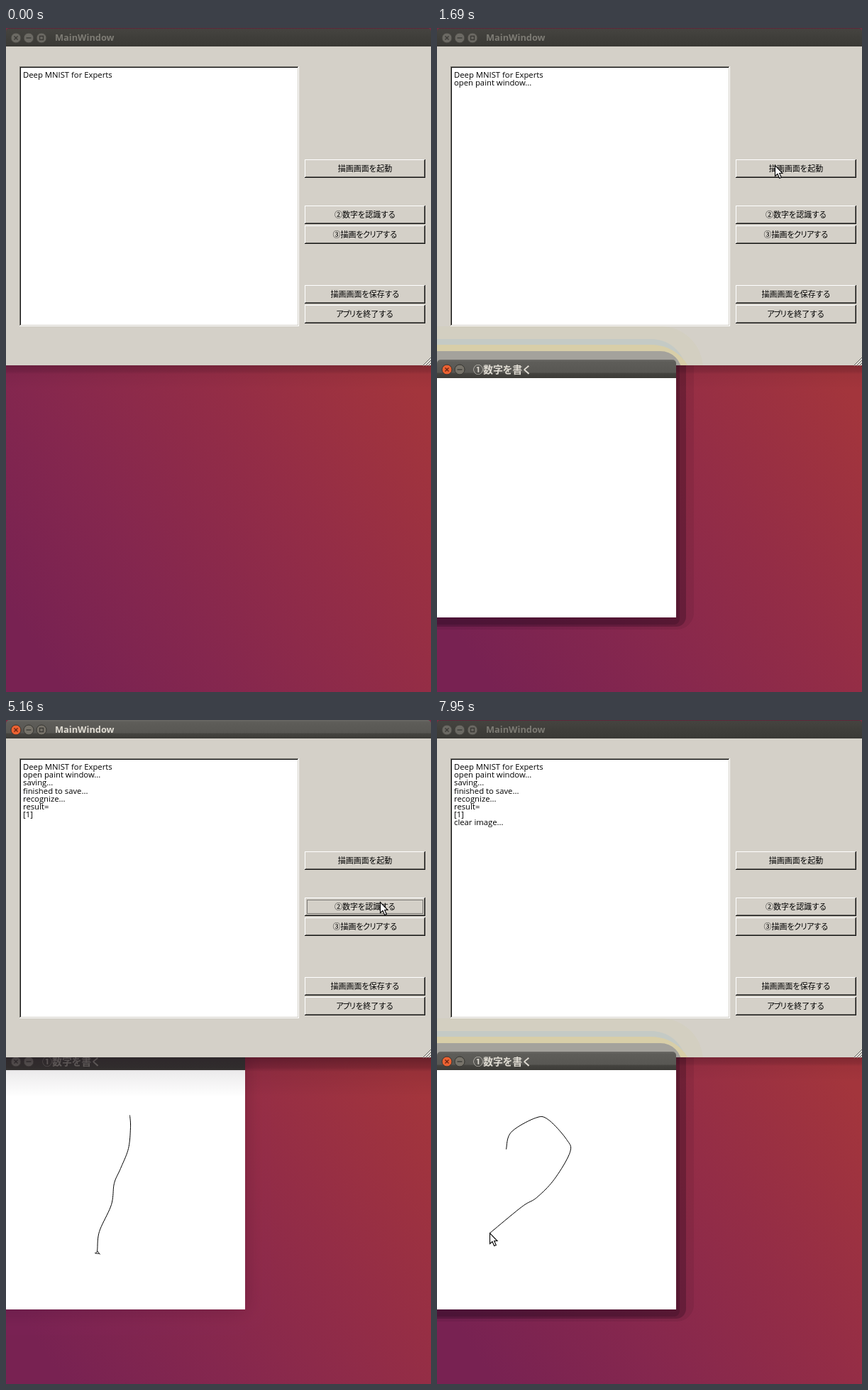
These frames come from a looping animation (599 px wide and 935 px high, 7.99 s). An HTML page with a canvas:

```html
<!DOCTYPE html>
<html lang="ja">
<head>
<meta charset="utf-8">
<title>MainWindow</title>
<style>
  html, body { margin: 0; width: 100%; height: 100%; overflow: hidden; background: #8a294b; }
  canvas { display: block; width: 100%; height: 100%; }
</style>
</head>
<body>
<canvas id="stage" width="599" height="935"></canvas>
<script>
const ctx = document.getElementById('stage').getContext('2d');
const W = 599, H = 935, LOOP = 7990;
const GRAY = '#d4d0c8', DARK = '#3c3b37';
const LATIN = '"Open Sans", "Noto Sans", sans-serif';
const CJK = '"Noto Sans CJK JP", "Noto Sans CJK", sans-serif';

// Moments at which the windows change
const CLICK_OPEN = 1330, OPENING = 1560, OPEN = 1690;
const CLICK_READ = 4460, READ = 4630;
const CLICK_CLEAR = 5960, CLEARED = 6050, PAINT_FRONT = 6100;

const lerp = (a, b, p) => a + (b - a) * p;
const clamp = p => Math.min(1, Math.max(0, p));
const ease = p => p * p * (3 - 2 * p);
const within = (t, from, to) => t >= from && t < to;

// Smooth curve through a few points (Catmull-Rom)
function curve(points, steps = 10) {
  const at = i => points[Math.min(points.length - 1, Math.max(0, i))];
  const out = [points[0]];
  for (let i = 0; i < points.length - 1; i++) {
    for (let s = 1; s <= steps; s++) {
      const u = s / steps;
      out.push([0, 1].map(k => {
        const [a, b, c, d] = [-1, 0, 1, 2].map(n => at(i + n)[k]);
        return b + .5 * u * (c - a + u * (2 * a - 5 * b + 4 * c - d + u * (3 * (b - c) + d - a)));
      }));
    }
  }
  return out;
}

// The first part of a path, cut at a share of its length
function cutPath(points, share) {
  const dist = (a, b) => Math.hypot(b[0] - a[0], b[1] - a[1]);
  let left = share * points.reduce((sum, p, i) => i ? sum + dist(points[i - 1], p) : 0, 0);
  const out = [points[0]];
  for (let i = 1; i < points.length && left > 0; i++) {
    const a = points[i - 1], b = points[i], d = dist(a, b), p = Math.min(1, left / d);
    out.push([lerp(a[0], b[0], p), lerp(a[1], b[1], p)]);
    left -= d;
  }
  return out;
}

const ONE = {
  from: 2300, to: 3340, pace: 1.5,
  path: curve([[174, 556], [175, 573], [172, 603], [161, 631], [152, 652], [148, 682],
    [131, 720], [128, 747], [125, 750], [131, 751]])
};
const TWO = {
  from: 6960, to: 7950, pace: 1.1,
  path: curve([[97, 604], [104, 580], [138, 560], [156, 562], [182, 590], [187, 608],
    [165, 646], [140, 672], [119, 685], [74, 722]])
};

// The pointer's trip: straight eased legs and pen strokes
const START = [84, 362];
const LEGS = [
  { from: 500, to: 1380, goal: [476, 193] },
  { from: 1820, to: 2100, goal: [123, 572] },
  { from: 2140, to: 2260, goal: [174, 556] },
  ONE,
  { from: 3430, to: 3760, goal: [553, 129] },
  { from: 3800, to: 4290, goal: [527, 256] },
  { from: 5160, to: 5320, goal: [515, 282] },
  { from: 5670, to: 5900, goal: [508, 293] },
  { from: CLEARED, to: 6430, goal: [231, 504] },
  { from: 6470, to: 6790, goal: [97, 604] },
  TWO
];

const LOG = [
  [0, ['Deep MNIST for Experts']],
  [1420, ['open paint window...']],
  [4500, ['saving...', 'finished to save...', 'recognize...']],
  [READ, ['result=', '[1]']],
  [CLEARED, ['clear image...']]
];

// Each button with the times of press, release and loss of focus
const BUTTONS = [
  { y: 185, label: '描画画面を起動', times: [CLICK_OPEN, 1420, 1510] },
  { y: 250, label: '②数字を認識する', times: [CLICK_READ, 4500, CLICK_CLEAR] },
  { y: 278, label: '③描画をクリアする', times: [CLICK_CLEAR, CLEARED, PAINT_FRONT] },
  { y: 362, label: '描画画面を保存する' },
  { y: 390, label: 'アプリを終了する' }
];

function drawn(stroke, t) {
  const p = clamp((t - stroke.from) / (stroke.to - stroke.from));
  return cutPath(stroke.path, p ** stroke.pace);
}

function pointerAt(t) {
  let pos = START;
  for (const leg of LEGS.filter(l => t >= l.from)) {
    const p = ease(clamp((t - leg.from) / (leg.to - leg.from)));
    pos = leg.path ? drawn(leg, t).pop() : pos.map((v, k) => lerp(v, leg.goal[k], p));
  }
  return pos;
}

function rect(x, y, w, h, color) {
  ctx.fillStyle = color;
  ctx.fillRect(x, y, w, h);
}

function round(x, y, w, h, r, color) {
  ctx.fillStyle = color;
  ctx.beginPath();
  ctx.roundRect(x, y, w, h, r);
  ctx.fill();
}

function ramp(x0, y0, x1, y1, ...stops) {
  const g = ctx.createLinearGradient(x0, y0, x1, y1);
  stops.forEach(([at, color]) => g.addColorStop(at, color));
  return g;
}

function polyline(points, color) {
  ctx.strokeStyle = color;
  ctx.lineWidth = 1;
  ctx.beginPath();
  points.forEach(([x, y]) => ctx.lineTo(x + .5, y + .5));
  ctx.stroke();
}

function clipBelow(top, height, paint) {
  ctx.save();
  ctx.beginPath();
  ctx.rect(0, top, W, height);
  ctx.clip();
  paint();
  ctx.restore();
}

function latin(text, x, y, font, color) {
  ctx.font = `${font} ${LATIN}`;
  ctx.fillStyle = color;
  ctx.fillText(text, x, y);
}

// Japanese text with kana set tighter than kanji
function japanese(text, x, y, size, color, { weight = 400, center = false } = {}) {
  const advance = c => size * (/[ァ-ヶ]/.test(c) ? .82 : /[ぁ-ん]/.test(c) ? .94 : 1);
  const chars = [...text];
  if (center) x -= chars.reduce((sum, c) => sum + advance(c), 0) / 2;
  ctx.font = `${weight} ${size}px ${CJK}`;
  ctx.fillStyle = color;
  for (const c of chars) {
    ctx.fillText(c, x - (size - advance(c)) / 2, y);
    x += advance(c);
  }
}

function desktop() {
  rect(0, 0, W, H, ramp(60, 900, 599, 540,
    [0, '#782252'], [.3, '#85274e'], [.65, '#942d46'], [1, '#a3353c']));
}

function titleButton(x, y, kind, active) {
  const hot = active && kind === 'close';
  ctx.beginPath();
  ctx.arc(x, y, 7, 0, 7);
  ctx.fillStyle = hot ? '#ec6232' : active ? '#77736a' : '#6b6963';
  ctx.fill();
  ctx.strokeStyle = active ? '#353430' : '#45443f';
  ctx.lineWidth = 1;
  ctx.stroke();
  ctx.strokeStyle = hot ? '#6b2412' : DARK;
  ctx.lineWidth = 1.4;
  ctx.beginPath();
  if (kind === 'close') {
    ctx.moveTo(x - 2.5, y - 2.5); ctx.lineTo(x + 2.5, y + 2.5);
    ctx.moveTo(x + 2.5, y - 2.5); ctx.lineTo(x - 2.5, y + 2.5);
  } else if (kind === 'min') {
    ctx.moveTo(x - 3.5, y); ctx.lineTo(x + 3.5, y);
  } else {
    ctx.rect(x - 2.5, y - 2.5, 5, 5);
  }
  ctx.stroke();
}

function titleBar(y, w, active, kinds) {
  const fill = active
    ? ramp(0, y, 0, y + 26, [0, '#6b6a66'], [.12, '#5e5d59'], [.7, '#585753'], [.73, '#454440'], [1, DARK])
    : ramp(0, y, 0, y + 26, [0, '#454440'], [1, '#3a3935']);
  round(0, y, w, 26, [5, 5, 0, 0], fill);
  kinds.forEach((kind, i) => titleButton(14 + 18 * i, y + 14, kind, active));
}

const titleColor = active => active ? '#dfdbd2' : '#7d7b74';

function bevel(x, y, w, h, sunken) {
  rect(x, y, w, h, sunken ? '#fff' : '#111');
  rect(x, y, w - 1, h - 1, sunken ? '#111' : '#fff');
  rect(x + 1, y + 1, w - 2, h - 2, sunken ? GRAY : '#6e6c67');
  rect(x + 1, y + 1, w - 3, h - 3, sunken ? '#77756f' : GRAY);
  rect(x + 2, y + 2, w - 4, h - 4, GRAY);
}

function button({ y, label, times = [] }, t) {
  const [press, release, blur] = times;
  const down = within(t, press, release), shift = down ? 1 : 0;
  bevel(421, y, 170, 26, down);
  if (within(t, press, blur)) {
    ctx.setLineDash([1, 1]);
    ctx.strokeStyle = '#222';
    ctx.lineWidth = 1;
    ctx.strokeRect(424.5, y + 3.5, 163, 19);
    ctx.setLineDash([]);
  }
  japanese(label, 506 + shift, y + 13 + shift, 11, '#000', { center: true });
}

function mainWindow(t, active) {
  const depth = active ? 56 : 34, dark = active ? .4 : .24;
  const shade = a => `rgba(15,0,15,${dark * a})`;
  rect(0, 475, W, depth, ramp(0, 475, 0, 475 + depth,
    [0, shade(1)], [.26, shade(.6)], [.36, shade(.2)], [1, shade(0)]));
  rect(0, 0, W, 6, '#7a2a42');
  titleBar(0, W, active, ['close', 'min', 'max']);
  if (!active) rect(3, 0, W - 6, 1, '#60263a');
  latin('MainWindow', 69, 14.5, '700 12.8px', titleColor(active));

  rect(0, 26, W, 449, GRAY);
  rect(19, 54, 394, 366, '#fff');
  rect(19, 54, 393, 365, '#77756f');
  rect(20, 55, 392, 364, GRAY);
  rect(20, 55, 391, 363, '#111');
  rect(21, 56, 390, 362, '#fff');
  LOG.filter(([at]) => t >= at).flatMap(([, lines]) => lines)
    .forEach((line, i) => latin(line, 24, 67 + i * 11.2, '11.3px', '#000'));
  BUTTONS.forEach(b => button(b, t));
  for (let d = 11; d > 0; d -= 4) {
    polyline([[598 - d, 475], [599, 474 - d]], '#55534e');
    polyline([[599 - d, 475], [599, 475 - d]], '#fff');
  }
}

function paintShadow() {
  clipBelow(420, 55, () => {
    round(-60, 420, 435, 200, 60, '#d3cfc1');
    round(-60, 438, 412, 200, 50, '#c4cac5');
    round(-60, 446, 422, 200, 60, '#d8cea8');
    round(-60, 455, 405, 200, 30, '#a4a29c');
  });
  clipBelow(475, H - 475, () => {
    const shade = a => `rgba(20,0,20,${a})`;
    round(-60, 440, 422, 407, 24, shade(.08));
    round(-60, 440, 411, 403, 14, shade(.24));
    round(-60, 440, 402, 400, 8, shade(.18));
  });
}

function paintWindow(t, active) {
  if (active) paintShadow();
  else {
    ctx.save();
    ctx.shadowColor = 'rgba(20,0,20,.2)';
    ctx.shadowBlur = 24;
    rect(-20, 475, 357, 355, '#222');
    ctx.restore();
  }
  titleBar(467, 337, active, ['close', 'min']);
  japanese('①数字を書く', 51, 481, 14, titleColor(active), { weight: 700 });
  rect(0, 493, 337, 337, '#fff');
  if (within(t, ONE.from, CLEARED)) {
    polyline(drawn(ONE, t), '#000');
    if (t >= ONE.to) polyline([[128, 747], [132, 752]], '#000');
  }
  if (t >= TWO.from) polyline(drawn(TWO, t), '#000');
}

// The paint window while it grows and fades in
function openingWindow(t) {
  const p = (t - OPENING) / (OPEN - OPENING), late = p > .6;
  const scale = lerp(.924, 1, p);
  round(-40, 445, 380, 30, [0, 30, 0, 0], '#d3cfc0');
  clipBelow(475, H - 475, () => {
    ctx.translate(168.5, 648.5);
    ctx.scale(scale, scale);
    ctx.translate(-168.5, -648.5);
    ctx.shadowColor = 'rgba(20,0,20,.35)';
    ctx.shadowBlur = 22;
    rect(0, 467, 337, 363, late ? '#4d3336' : '#742437');
    ctx.shadowColor = 'transparent';
    ctx.beginPath();
    ctx.arc(14, 481, 6, 0, 7);
    ctx.fillStyle = late ? '#b8502f' : '#8b3535';
    ctx.fill();
    japanese('①数字を書く', 51, 481, 14, late ? '#b5aea4' : '#857c6c');
    rect(0, 493, 337, 337, late ? '#c6c0b8' : '#86796b');
  });
}

function pointer(t) {
  if (t < LEGS[0].from) return;
  const [x, y] = pointerAt(t);
  ctx.save();
  ctx.translate(Math.round(x) + .5, Math.round(y) + .5);
  ctx.beginPath();
  [[0, 0], [0, 15], [3.5, 12], [6.2, 18], [8.8, 17], [6.2, 11], [10.5, 11]]
    .forEach(p => ctx.lineTo(...p));
  ctx.closePath();
  ctx.fillStyle = '#fff';
  ctx.fill();
  ctx.strokeStyle = '#000';
  ctx.lineWidth = 1.1;
  ctx.stroke();
  ctx.restore();
}

function draw(t) {
  ctx.textBaseline = 'middle';
  const mainOnTop = within(t, CLICK_READ, PAINT_FRONT);
  desktop();
  if (mainOnTop) paintWindow(t, false);
  mainWindow(t, mainOnTop || within(t, CLICK_OPEN, 1510));
  if (within(t, OPENING, OPEN)) openingWindow(t);
  else if (t >= OPEN && !mainOnTop) paintWindow(t, true);
  pointer(t);
}

const start = performance.now();
function tick() {
  draw((performance.now() - start) % LOOP);
  requestAnimationFrame(tick);
}
tick();
</script>
</body>
</html>
```
